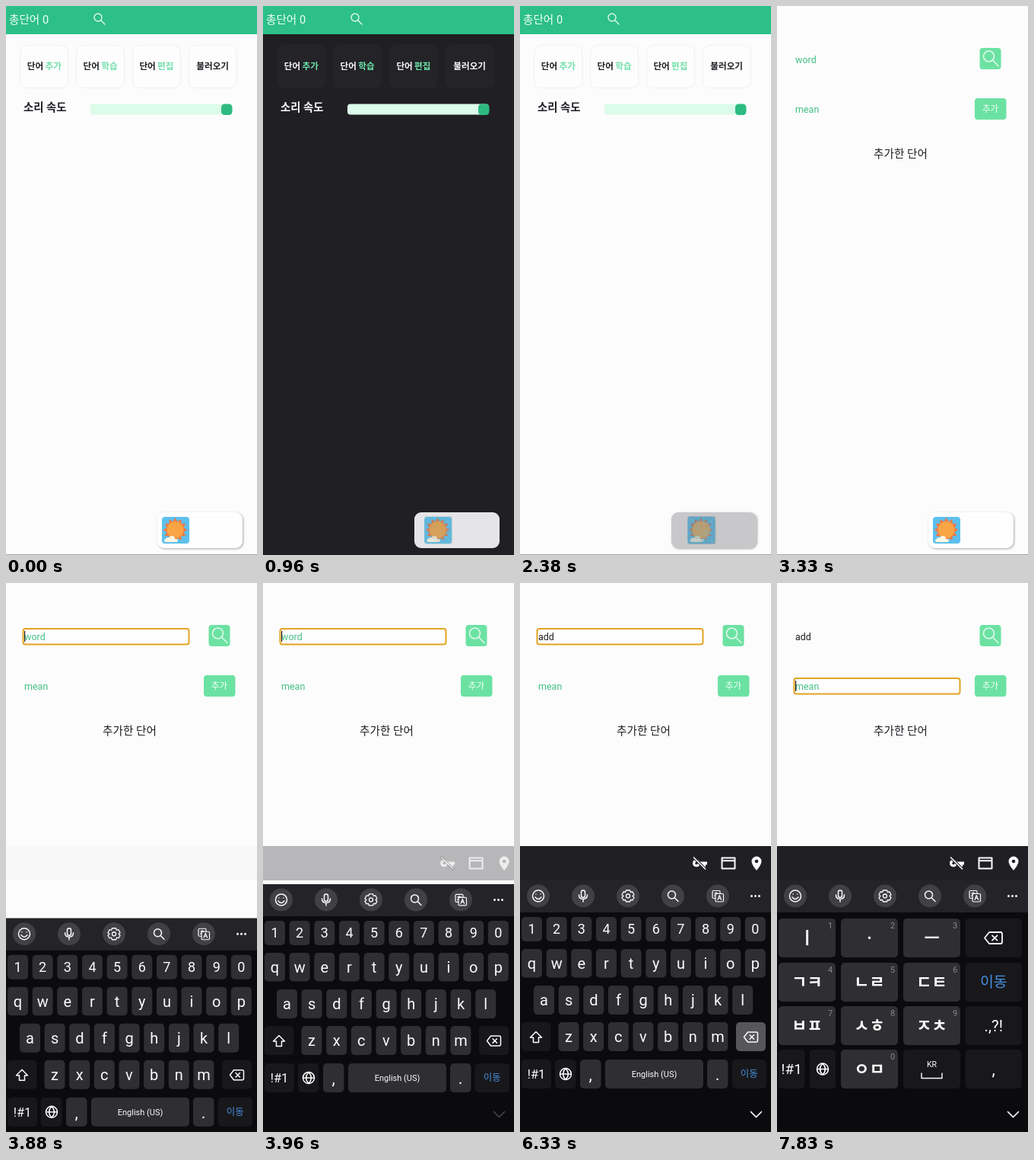
An HTML page with a canvas that plays this animation: 330 by 720 pixels, repeating every 8 s.

```html
<!DOCTYPE html>
<html lang="ko">
<head>
<meta charset="utf-8">
<style>
html, body { margin: 0; width: 100%; height: 100%; overflow: hidden; background: #fcfcfd; }
canvas { display: block; width: 330px; height: 720px; }
</style>
</head>
<body>
<canvas id="stage"></canvas>
<script>
const LOOP = 8000;
const FONT = "Roboto, 'Noto Sans CJK KR', sans-serif";
const PAPER = '#fcfcfd', INK = '#1f1f24', NIGHT = '#202024', WHITE = '#fbfbfd';
const KEY = '#2f2f32', KEY_DIM = '#18181b', KEY_DOWN = '#57575b', BLUE = '#4890e0';

const stage = document.getElementById('stage');
const dpr = window.devicePixelRatio || 1;
stage.width = 330 * dpr;
stage.height = 720 * dpr;
const ctx = stage.getContext('2d');

const clamp = v => Math.max(0, Math.min(1, v));
const smooth = v => { v = clamp(v); return v * v * (3 - 2 * v); };
const within = (t, a, b) => t >= a && t < b;

function box(x, y, x2, y2, r, fill, stroke, width = 1) {
  ctx.beginPath();
  ctx.roundRect(x, y, x2 - x, y2 - y, r);
  if (fill) { ctx.fillStyle = fill; ctx.fill(); }
  if (stroke) { ctx.strokeStyle = stroke; ctx.lineWidth = width; ctx.stroke(); }
}

// y is the visual middle of the line
function text(s, x, y, size, color, align = 'left', weight = 400) {
  ctx.font = `${weight} ${size}px ${FONT}`;
  ctx.textAlign = align;
  ctx.fillStyle = color;
  ctx.fillText(s, x, y + size * .36);
}

function disc(x, y, r, color) {
  ctx.beginPath();
  ctx.arc(x, y, r, 0, 7);
  ctx.fillStyle = color;
  ctx.fill();
}

function icon(d, x, y, color = WHITE, width = 1.5, filled = false) {
  const path = new Path2D(d);
  ctx.save();
  ctx.translate(x, y);
  ctx.lineCap = ctx.lineJoin = 'round';
  ctx.strokeStyle = ctx.fillStyle = color;
  ctx.lineWidth = width;
  if (filled) ctx.fill(path, 'evenodd'); else ctx.stroke(path);
  ctx.restore();
}

function faded(alpha, draw) {
  ctx.save();
  ctx.globalAlpha *= clamp(alpha);
  draw();
  ctx.restore();
}

const ring = (x, y, r) => `M${x - r} ${y}a${r} ${r} 0 1 0 ${2 * r} 0a${r} ${r} 0 1 0 ${-2 * r} 0`;
const LENS = ring(-1.5, -1.5, 5) + 'M2.2 2.2L7 7';
const GLOBE = ring(0, 0, 7.5) + 'M-7.5 0H7.5M0-7.5Q-7 0 0 7.5Q7 0 0-7.5';
const BACKSPACE = 'M-9 0L-4-6.5H7Q9-6.5 9-4.5V4.5Q9 6.5 7 6.5H-4ZM-1.5-2.7L4 2.7M4-2.7L-1.5 2.7';
const BACKSPACE_WIDE = 'M-12 0L-6-7.5H9Q11-7.5 11-5.5V5.5Q11 7.5 9 7.5H-6ZM-2-3.2L4.5 3.2M4.5-3.2L-2 3.2';
const SHIFT = 'M0-7L7.5 .5H3.5V7H-3.5V.5H-7.5Z';

// --- day / night switch ---

function sun(x) {
  box(x, 670, x + 36, 705, 4, '#5cc0ee');
  const cx = x + 17.5, cy = 687;
  ctx.beginPath();
  for (let i = 0; i < 24; i++) {
    const a = i * Math.PI / 12, r = i % 2 ? 11.5 : 16;
    ctx.lineTo(cx + r * Math.cos(a), cy + r * Math.sin(a));
  }
  ctx.fillStyle = '#ea7b4a';
  ctx.fill();
  disc(cx, cy, 11, '#fba444');
  disc(x + 8, 700, 3, '#fff6e4');
  disc(x + 13, 699, 4, '#fff6e4');
  box(x + 3, 699, x + 21, 703, 2, '#fff6e4');
}

function moon(x) {
  box(x, 669, x + 37, 706, 2, '#1b5268');
  disc(x + 18.5, 687.5, 12.5, '#a6d8d4');
  disc(x + 14, 684, 3.2, '#86bdbb');
  disc(x + 23, 691, 4, '#86bdbb');
  disc(x + 16, 694, 2, '#86bdbb');
  for (const [dx, y] of [[6, 674], [31, 676], [5, 699], [32, 701]]) disc(x + dx, y, .9, '#eef6ea');
}

const switchPos = t => smooth((t - 40) / 400) - smooth((t - 440) / 390)
  + smooth((t - 875) / 415) - smooth((t - 2040) / 500);

function toggle(t, dark) {
  const p = switchPos(t), x = 205 + 64 * p;
  ctx.save();
  if (!dark) {
    ctx.shadowColor = '#0005';
    ctx.shadowBlur = 3 * dpr;
    ctx.shadowOffsetX = ctx.shadowOffsetY = dpr;
  }
  box(199, 664, 311, 711, 9, '#fefeff');
  ctx.restore();
  faded(p, () => box(199, 664, 311, 711, 9, NIGHT));
  faded(1 - p, () => sun(x));
  faded(p, () => moon(x));
}

// --- pages ---

function home(dark) {
  const ink = dark ? WHITE : INK, leaf = dark ? '#6ee5a8' : '#72dfaa';
  box(0, 0, 330, 37, 0, '#2dbf88');
  text('총단어 0', 4, 17.5, 14.6, '#effff8');
  icon(ring(-2, -2, 5) + 'M1.8 1.8L7 7', 123, 17, '#dff8ee', 1.4);
  ['추가', '학습', '편집', ''].forEach((word, i) => {
    const mid = 50.3 + i * 73.8;
    box(mid - 31.5, 51.5, mid + 31.5, 107.5, 9, dark ? '#232328' : '#fdfdfe', dark ? '#26262b' : '#f0f0f2');
    if (!word) return text('불러오기', mid, 79, 11.6, ink, 'center', 700);
    text('단어', mid - 22.5, 79, 11.6, ink, 'left', 700);
    text(word, mid + 22.5, 79, 11.6, leaf, 'right', 700);
  });
  text('소리 속도', 23, 133, 14.4, ink, 'left', 700);
  box(111, 128.5, 297, 142.5, 4, '#dcfce9');
  box(283, 128.5, 297.5, 143, 4.5, '#2dba80');
}

const presses = [
  ['a', 4620, 4760], ['d', 4920, 5040], ['d', 5160, 5290],
  ['m', 5540, 5700], ['back', 6250, 6460], ['globe', 6900, 6980]
];
const pressed = (key, t) => presses.some(([k, a, b]) => k === key && within(t, a, b));

function typed(t) {
  let s = '';
  for (const [key, at] of presses) {
    if (t < at) break;
    if (key === 'back') s = s.slice(0, -1);
    else if (key.length === 1) s += key;
  }
  return s;
}

function field(y, value, hint, focused, t) {
  if (focused) box(22.5, y - 10, 240.5, y + 10.5, 3, '#fefeff', '#e3a422', 2);
  text(value || hint, 24, y, 12.5, value ? INK : '#44c084');
  if (!focused) return;
  const since = t - [3500, 4620, 4920, 5160, 5540, 6700].filter(a => a <= t).pop();
  if (since % 1000 < 500) {
    const x = 24 + ctx.measureText(value).width;
    box(x, y - 7, x + 1.2, y + 7, 0, INK);
  }
}

function addPage(t) {
  field(70, typed(t), 'word', within(t, 3500, 6700), t);
  field(135, '', 'mean', t >= 6700, t);
  box(266.5, 55, 294.5, 83, 4, '#6ce2a2');
  icon(ring(278.5, 66, 7) + 'M283.5 71L291 78.5', 0, 0, '#ddf8ea', 1.7);
  box(260, 121, 301.5, 149, 4, '#6ce2a2');
  text('추가', 280.5, 135, 11.4, '#f4fff9', 'center');
  text('추가한 단어', 162.5, 194, 14.6, INK, 'center');
}

// --- keyboard ---

function key(x, y, x2, y2, label, size, { fill = KEY, color = WHITE, weight = 400, down = false } = {}) {
  box(x, y, x2, y2, 5, down ? KEY_DOWN : fill);
  if (label) text(label, (x + x2) / 2, (y + y2) / 2, size, color, 'center', weight);
}

function toolbar() {
  box(0, 390, 330, 432, 0, '#242428');
  for (let i = 0; i < 5; i++) disc(24 + 59 * i, 410.5, 15, '#414144');
  icon(ring(0, 0, 7.5) + 'M-4 1.5Q0 6.5 4 1.5M-3-2.5v.1M3-2.5v.1', 24, 410.5);
  icon('M-2.5-4.5a2.5 2.5 0 0 1 5 0V0a2.5 2.5 0 0 1-5 0ZM-5.5-1Q-5.5 4.5 0 4.5T5.5-1M0 4.5V8', 83, 410);
  icon('M-2.5-7.5H2.5L3.5-5L6-5.5L8-1.5L6 0L8 2L6 5.5L3.5 5L2.5 7.5H-2.5L-3.5 5L-6 5.5L-8 2L-6 0L-8-1.5L-6-5.5L-3.5-5Z'
    + ring(0, 0, 2.5), 142, 410.5, WHITE, 1.3);
  icon(LENS, 201, 410.5);
  icon('M-3 3H-5.5Q-7 3-7 1.5V-5.5Q-7-7-5.5-7H1.5Q3-7 3-5.5V-3M-4.5-3.5H.5M-2-5V-3.5Q-2.5-1-4.5 0', 260, 410.5, WHITE, 1.2);
  icon('M-1.5-3H6Q7.5-3 7.5-1.5V6Q7.5 7.5 6 7.5H-1.5Q-3 7.5-3 6V-1.5Q-3-3-1.5-3ZM0 5L2.3-1L4.6 5M1 3H3.7', 260, 410.5, WHITE, 1.2);
  for (let i = 0; i < 3; i++) disc(304.5 + 5 * i, 410.5, 1.5, WHITE);
}

function english(t) {
  const rows = [
    ['1234567890', 2, 438, 470, 18], ['qwertyuiop', 2, 480, 517.5, 20],
    ['asdfghjkl', 18, 528, 566, 20], ['zxcvbnm', 50.5, 576, 614, 20]
  ];
  for (const [chars, x0, y, y2, size] of rows)
    [...chars].forEach((c, i) => {
      const x = x0 + i * 32.65;
      key(x, y, x + 27, y2, c, size, { down: pressed(c, t) });
    });
  const dim = { fill: KEY_DIM };
  key(2, 576, 40.5, 614, '', 0, dim);
  icon(SHIFT, 21, 595.5);
  key(284, 576, 323, 614, '', 0, { fill: KEY_DIM, down: pressed('back', t) });
  icon(BACKSPACE, 303.5, 595.5);
  key(2, 625, 41, 663, '!#1', 16.5, dim);
  key(46, 625, 73.5, 663, '', 0, { fill: KEY_DIM, down: pressed('globe', t) });
  icon(GLOBE, 60, 644);
  key(79, 625, 106.5, 663, ',', 22);
  key(112, 625, 241, 663, 'English (US)', 11);
  key(246, 625, 273.5, 663, '.', 22);
  key(278.5, 625, 324, 663, '이동', 12.4, { fill: KEY_DIM, color: BLUE });
}

function korean() {
  const dim = { fill: KEY_DIM };
  const xs = [2, 84, 166], ys = [440, 498, 555, 612];
  ['ㅣ', '·', 'ㅡ', 'ㄱㅋ', 'ㄴㄹ', 'ㄷㅌ', 'ㅂㅍ', 'ㅅㅎ', 'ㅈㅊ', '', 'ㅇㅁ'].forEach((label, i) => {
    if (!label) return;
    const x = xs[i % 3], y = ys[i / 3 | 0];
    key(x, y, x + 75, y + 51, label, 22, { weight: 700 });
    text((i < 9 ? i + 1 : 0) + '', x + 68, y + 9.5, 11, '#88888b', 'center');
  });
  key(247.5, 440, 322, 491, '', 0, dim);
  icon(BACKSPACE_WIDE, 285, 465.5, WHITE, 1.8);
  key(247.5, 498, 322, 549, '이동', 19.4, { fill: KEY_DIM, color: BLUE });
  key(247.5, 555, 322, 606, '.,?!', 20.5, dim);
  key(247.5, 612, 322, 663, ',', 22, dim);
  key(2, 612, 36.5, 663, '!#1', 19, dim);
  key(43, 612, 77, 663, '', 0, dim);
  icon(GLOBE, 60, 637.5, WHITE, 1.6);
  key(166, 612, 241, 663, '', 0, dim);
  text('KR', 203.5, 631, 10.5, WHITE, 'center');
  icon('M-13.5-3V3.5H13.5V-3', 203.5, 646, WHITE, 1.4);
}

function autofill(p) {
  const shift = 9 * (1 - p), y = 367.5;
  faded(p, () => box(0, 345, 330, 390, 0, NIGHT));
  faded(p * 2.5, () => {
    icon('M-10 0a5 5 0 0 1 9.5-2H9V2H7V5H3.5V2H-.5A5 5 0 0 1-10 0Z' + ring(-5, 0, 1.8), 237 + shift, y, WHITE, 1, true);
    faded(p, () => icon('M-8.5-7.5L6.5 7.5', 237 + shift, y, NIGHT, 3.5));
    icon('M-8.5-7.5L6.5 7.5', 237 + shift, y, WHITE, 1.6);
    icon('M-8.5-7H8.5V7H-8.5ZM-8.5-3.2H8.5', 274 + shift, y, WHITE, 2);
    icon('M0 9.5Q-6.5 2-6.5-2.5A6.5 6.5 0 0 1 6.5-2.5Q6.5 2 0 9.5Z' + ring(0, -2.5, 2.3), 311 + shift, y, WHITE, 1, true);
  });
}

function keyboard(t) {
  const drop = 330 * (1 - clamp((t - 3750) / 280)) ** 3;
  autofill(smooth((t - 3860) / 270));
  ctx.save();
  ctx.translate(0, drop);
  box(0, 390, 330, 720, 0, '#0b0b0d');
  toolbar();
  if (t < 6980) english(t); else korean();
  ctx.restore();
  faded((t - 3900) / 250, () => icon('M-7-3.5L0 3.5L7-3.5', 310.5, 697, WHITE, 1.7));
}

function draw(now) {
  const t = now % LOOP;
  const dark = within(t, 40, 440) || within(t, 875, 1750);
  ctx.setTransform(dpr, 0, 0, dpr, 0, 0);
  box(0, 0, 330, 720, 0, dark ? NIGHT : PAPER);
  if (!dark) box(0, 719, 330, 720, 0, '#a3a3a6');
  if (t < 2750) home(dark); else addPage(t);
  toggle(t, dark);
  if (t >= 3750) keyboard(t);
}

const start = performance.now();
function tick() {
  draw(performance.now() - start);
  requestAnimationFrame(tick);
}
tick();
</script>
</body>
</html>
```
